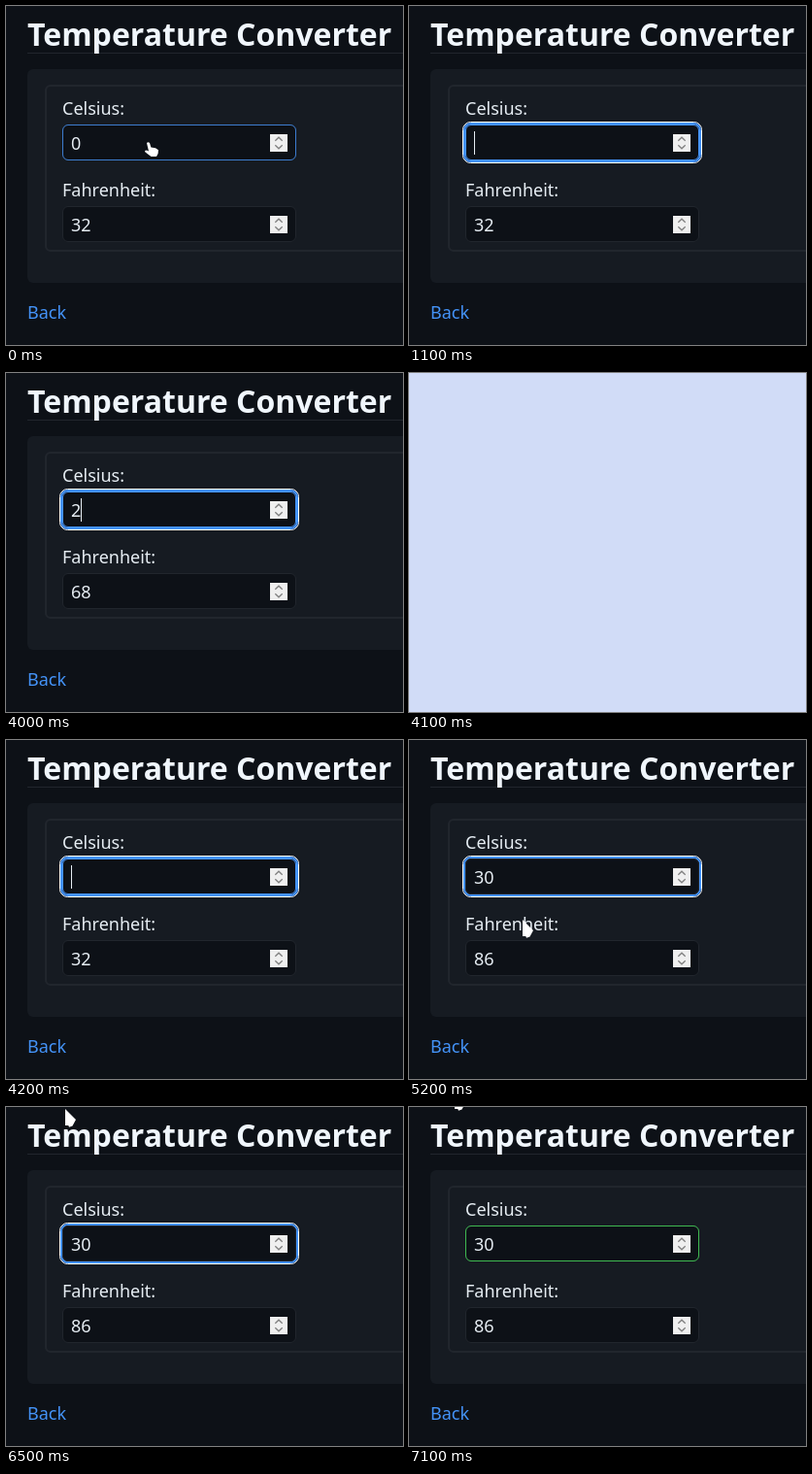
Animation, 409 px wide and 349 px high, one loop 7400 ms. Source, as an HTML page:

```html
<!DOCTYPE html>
<html lang="en">
<head>
<meta charset="utf-8">
<title>Temperature Converter</title>
<style>
  html, body { margin: 0; width: 100%; height: 100%; overflow: hidden; background: #0d1117; }
  svg { display: block; font: 18px "Noto Sans", "Open Sans", sans-serif; fill: #e6edf3; }
  h1, .title { font-size: 32px; font-weight: 700; fill: #f0f6fc; }
  .line { fill: none; stroke: #21262d; }
  .box { fill: #0d1117; stroke: #21262d; }
  .hover { fill: none; stroke: #4493f8; }
  .valid { fill: none; stroke: #3fb950; }
  .chevron { fill: none; stroke: #808080; stroke-width: 1.3; }
</style>
</head>
<body>
<svg width="409" height="349" viewBox="0 0 409 349">
  <defs>
    <g id="spin">
      <rect x="272" y="10" width="18" height="18" fill="#efefef"/>
      <path class="chevron" d="M277.3 16.8l3.7-3.6 3.7 3.6M277.3 21.2l3.7 3.6 3.7-3.6"/>
    </g>
    <rect id="frame" x="58.5" y=".5" width="240" height="36" rx="5.5"/>
  </defs>
  <rect width="409" height="349" fill="#0d1117"/>
  <rect x="22" y="48" width="387" height="1" fill="#21262d"/>
  <text class="title" x="22" y="41">Temperature Converter</text>
  <rect x="22" y="65" width="400" height="220" rx="6" fill="#161b22"/>
  <rect class="line" x="41" y="82" width="400" height="170" rx="5" stroke-width="2"/>

  <text x="58" y="112">Celsius:</text>
  <g id="ring" fill="none">
    <rect x="55.5" y="119.5" width="246" height="42" rx="8" stroke="#fff"/>
    <rect x="57" y="121" width="243" height="39" rx="7" stroke="#4493f8" stroke-width="2"/>
  </g>
  <g transform="translate(0 122)">
    <use href="#frame" class="box"/>
    <use href="#frame" class="hover" id="hoverC"/>
    <use href="#frame" class="valid" id="valid"/>
    <use href="#spin"/>
    <text id="celsius" x="67" y="26"></text>
    <rect id="caret" y="7" width="1" height="24"/>
  </g>

  <text x="58" y="196">Fahrenheit:</text>
  <g transform="translate(0 206)">
    <use href="#frame" class="box"/>
    <use href="#frame" class="hover" id="hoverF"/>
    <use href="#spin"/>
    <text id="fahrenheit" x="67" y="26"></text>
  </g>

  <text x="22" y="322" style="fill:#4493f8">Back</text>
  <path id="cursor" fill="#fff"/>
  <rect id="flash" width="409" height="349" fill="#d1dcf7"/>
</svg>
<script>
const LOOP = 7400, DIGIT = 10.3;
const HAND = 'M3 1Q4.5-.5 6 1L7.4 5.4 12 6.2 15 8.2 14.6 12 13 15H7.5L1.5 10.6 1 9 3 8.4 5 9.4Z';
const ARROW = 'M1 0L12 11 8.5 17.5 5 18.8 4.3 17 1 17Z';

// time, typed text, converted value, caret
const typing = [
  [0, '0', 0, 0], [400, '0', 0, 1],
  [1100, '', 0, 1], [1200, '1', 1, 1], [1300, '10', 10, 1],
  [2400, '1', 10, 1], [2500, '1', 1, 1], [2700, '', 1, 1], [2800, '', 0, 1],
  [3200, '2', 0, 1], [3300, '20', 2, 1], [3400, '20', 20, 1], [3600, '20', 20, 0],
  [4000, '2', 20, 1], [4200, '', 0, 1], [4300, '3', 3, 1], [4400, '30', 30, 1], [4900, '30', 30, 0]
];

// time, shape, x, y
const pointer = [
  [0, HAND, 142, 140], [800, HAND, 140, 136], [1100, ''],
  [4900, HAND, 138, 136], [5000, HAND, 133, 142], [5100, ARROW, 126, 164],
  [5200, ARROW, 116, 185], [5300, HAND, 106, 208], [5400, HAND, 101, 217], [5500, HAND, 98, 224],
  [5700, ARROW, 84, 262], [5800, ARROW, 70, 305], [5900, ARROW, 66, 322],
  [6000, ARROW, 66, 290], [6100, HAND, 66, 215], [6200, ARROW, 66, 95], [6300, ARROW, 66, 10],
  [6500, ARROW, 60, 2], [6600, ARROW, 52, -8], [6700, ARROW, 46, -15]
];

// time, opacity
const levels = {
  hoverC: [[0, .8], [100, 1], [5100, .5], [5200, 0]],
  hoverF: [[0, 0], [5300, .5], [5400, 1], [5700, .5], [5800, 0], [6100, .4], [6200, 0]],
  ring: [[0, 0], [300, .5], [400, 1], [6900, 0]],
  valid: [[0, 0], [7000, .5], [7100, 1]],
  flash: [[0, 0], [4100, 1], [4200, 0]]
};

const $ = id => document.getElementById(id);
const at = (steps, t) => steps.findLast(s => s[0] <= t);

function draw(t) {
  const [, text, value, caret] = at(typing, t);
  $('celsius').textContent = text;
  $('fahrenheit').textContent = value * 9 / 5 + 32;
  $('caret').setAttribute('x', Math.round(67 + DIGIT * text.length));
  $('caret').setAttribute('opacity', caret);

  const [, shape, x = 0, y = 0] = at(pointer, t);
  $('cursor').setAttribute('d', shape);
  $('cursor').setAttribute('transform', `translate(${x} ${y})`);

  for (const id in levels) $(id).setAttribute('opacity', at(levels[id], t)[1]);
}

const start = performance.now();
function tick() {
  draw((performance.now() - start) % LOOP);
  requestAnimationFrame(tick);
}
tick();
</script>
</body>
</html>
```
